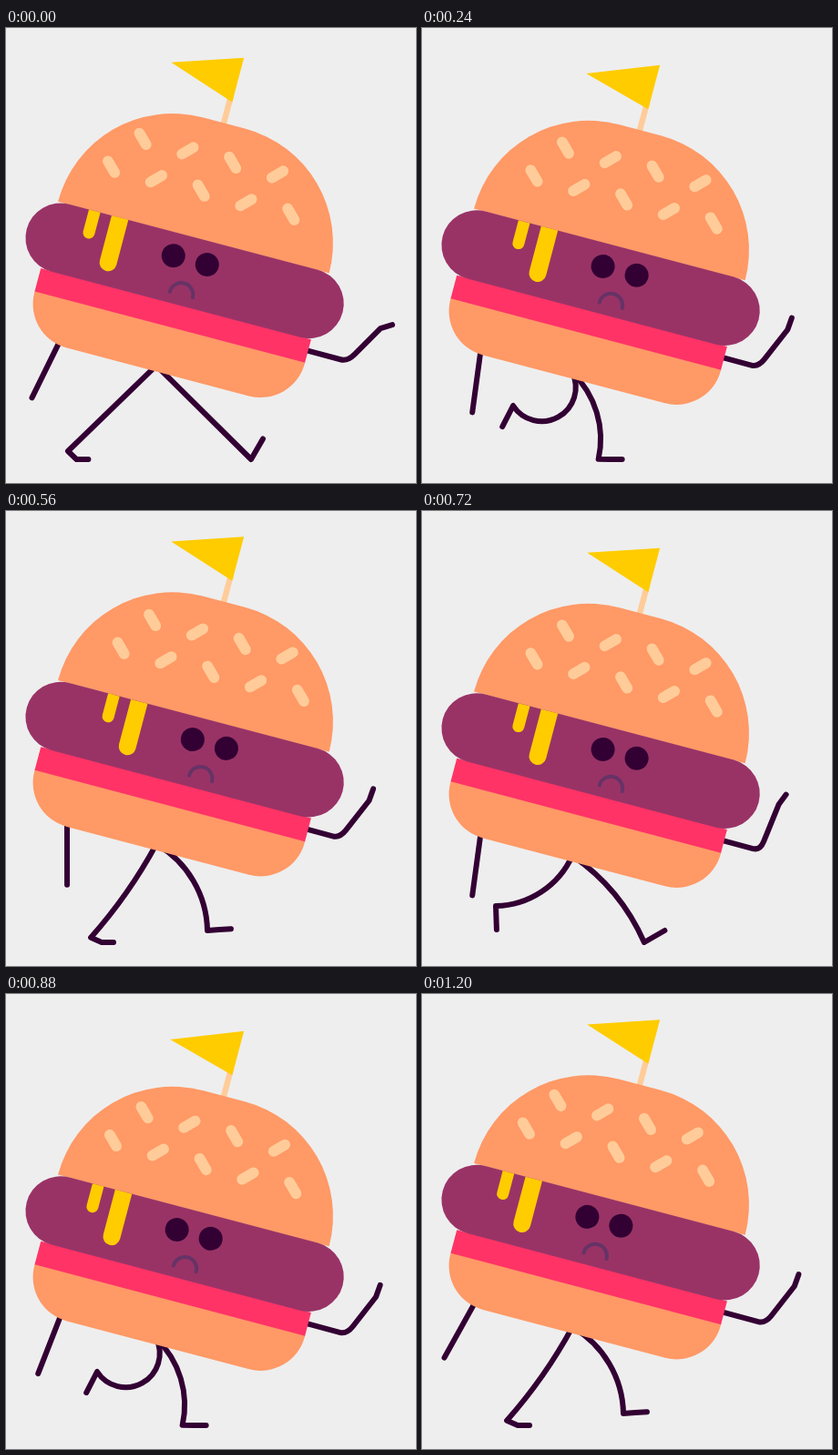
These frames come from a looping animation (450x500 px, 1.28 s). An HTML page:

```html
<!DOCTYPE html>
<html lang="en">
<head>
<meta charset="utf-8">
<title>Walking burger</title>
<style>
  html, body { margin: 0; width: 100%; height: 100%; overflow: hidden; background: #eee; }
  svg { display: block; width: 100%; height: 100%; }
  .limb { fill: none; stroke: #303; stroke-width: 6; stroke-linecap: round; stroke-linejoin: round; }
</style>
</head>
<body>
<svg viewBox="0 0 450 500">
  <g class="limb">
    <path id="legA"/>
    <path id="legB"/>
    <path id="backArm"/>
    <path id="frontArm"/>
  </g>
  <g id="burger">
    <path d="M153.4 -238V-203" stroke="#fc9" stroke-width="6.4"/>
    <path id="flag" fill="#fc0"/>
    <path d="M-0.5 -76.5A130 130 0 0 1 129.5 -206.5H177.3A130 130 0 0 1 307.3 -76.5Z" fill="#f96"/>
    <g id="seeds" stroke="#fc9" stroke-width="11.8" stroke-linecap="round"></g>
    <path d="M0 25H306.8V26.5A50 50 0 0 1 256.8 76.5H50A50 50 0 0 1 0 26.5Z" fill="#f96"/>
    <rect x="0" y="-1" width="306.8" height="26.5" fill="#f36"/>
    <rect x="-26" y="-76.8" width="358.7" height="76.6" rx="38.3" fill="#936"/>
    <g id="face">
      <path d="M34.5 -76.8H47.5V-52.2A6.5 6.5 0 0 1 34.5 -52.2Z" fill="#fc0"/>
      <path d="M60.3 -76.8H79.3V-25.7A9.5 9.5 0 0 1 60.3 -25.7Z" fill="#fc0"/>
      <circle cx="137.1" cy="-51.4" r="13" fill="#303"/>
      <circle cx="175.4" cy="-51.4" r="13" fill="#303"/>
      <path d="M143.5 -12.2A12.9 12.9 0 0 1 169.3 -12.2" fill="none" stroke="#636" stroke-width="4" stroke-linecap="round"/>
    </g>
  </g>
</svg>
<script>
const STEP = 80, STEPS = 16, GROUND = 474, TILT = 14.8;
const { sin, cos, asin, abs, hypot, max, floor, PI } = Math;
const $ = id => document.getElementById(id);
const rad = deg => deg * PI / 180;
const mix = (a, b, u) => a + (b - a) * u;
const put = (id, name, value) => $(id).setAttribute(name, value);
const polar = ([x, y], len, a) => [x + len * cos(a), y + len * sin(a)];
const line = points => "M" + points.map(p => p.join(" ")).join("L");

// Key poses of the foot in the air: heel x, y and foot angle
const SWING = [[81, 434, 88], [100, 415, 117], [144, 441, 69], [221, 461, -4]];

function addSeeds(count, x0, y) {
  for (let i = 0; i < count; i++) {
    const x = x0 + 51 * i, s = i % 2 ? -5.1 : 5.1;
    const d = line([[x - 5.1, y - s], [x + 5.1, y + s]]);
    $("seeds").insertAdjacentHTML("beforeend", `<path d="${d}"/>`);
  }
}
addSeeds(4, 71.8, -166.9);
addSeeds(5, 46.3, -128.3);

// Parabolic bounce, two per loop
function bob(k) {
  const u = ((k + 2) % 8 - 4) / 4;
  return 25 * (1 - abs(u)) ** 2 - 6.4;
}

// Sway from 0 to 1 and back, eased at both ends
function sway(k) {
  const x = 1 - abs((k + 2) % STEPS - 8) / 8;
  return x < 0.5 ? 2 * x * x : 1 - 2 * (1 - x) ** 2;
}

// The planted foot slides back and rolls up from the heel
function planted(u) {
  const lift = 9 * u ** 4;
  const strike = rad(-60 * max(0, 1 - 4 * u));
  return {
    heel: [mix(269, 68, u), GROUND - lift],
    sole: strike + asin(lift / 13),
    toe: strike,
    bulge: 13 * sin(PI * u ** 0.7)
  };
}

function lifted(u) {
  const pos = u * 4 - 0.5, i = floor(pos);
  const next = SWING[i + 1] || SWING[i];
  const [x, y, deg] = SWING[i].map((v, j) => mix(v, next[j], pos - i));
  return { heel: [x, y], sole: rad(deg), toe: rad(deg), bulge: 38 * sin(PI * u) };
}

function leg(k, dy) {
  const p = k % STEPS;
  const { heel, sole, toe, bulge } = p <= 8 ? planted(p / 8) : lifted((p - 8) / 8);
  const hip = [165, 371 + dy];
  const half = hypot(heel[0] - hip[0], heel[1] - hip[1]) / 2;
  const r = (half * half + bulge * bulge) / (2 * max(bulge, 0.01));
  const ball = polar(heel, 13, sole);
  return `M${hip}A${r} ${r} 0 0 1 ${heel}L${ball}L${polar(ball, 13, toe)}`;
}

function backArm(e, dy) {
  const shoulder = [67, 328 + dy];
  return line([shoulder, polar(shoulder, 87.5, rad(120 - 31 * e))]);
}

// The forearm waves four times per loop, the hand trails it
function frontArm(k, e, dy) {
  const a = PI * k / 2, wave = 8 * sin(a) - 15 * cos(a);
  const hand = rad(45 * cos(a) + 8.5 * sin(a) - 62);
  const fore = rad(-60 - wave), upper = rad(15);
  const x = 378 - 11 * e + 0.12 * wave;
  const elbow = [x, 355 + dy + (x - 332) * 0.268];
  const wrist = polar(elbow, 53.4 + 0.15 * wave, fore);
  return `M${polar(elbow, -52, upper)}L${polar(elbow, -8, upper)}` +
    `Q${elbow} ${polar(elbow, 11, fore)}L${wrist}L${polar(wrist, 13.6, hand)}`;
}

// The flag flaps at each landing and settles
function flag(k) {
  const flap = rad(6 * (-0.55) ** ((k + 6) % 8));
  const tip = polar([156.5, -256], -76, flap);
  return line([[156.5, -281.3], [156.5, -231], tip]) + "Z";
}

function draw(k) {
  const dy = bob(k), e = sway(k), slide = 25.9 * e - 3.2;
  put("legA", "d", leg(k, dy));
  put("legB", "d", leg(k + 8, dy));
  put("backArm", "d", backArm(e, dy));
  put("frontArm", "d", frontArm(k, e, dy));
  put("flag", "d", flag(k));
  put("burger", "transform", `translate(38 ${265 + dy}) rotate(${TILT})`);
  put("face", "transform", `translate(${slide} 0)`);
  put("seeds", "transform", `translate(${slide / 2} 0)`);
}

const start = performance.now();
function tick() {
  const t = max(0, performance.now() - start);
  draw(floor(t / STEP) % STEPS);
  requestAnimationFrame(tick);
}
tick();
</script>
</body>
</html>
```
